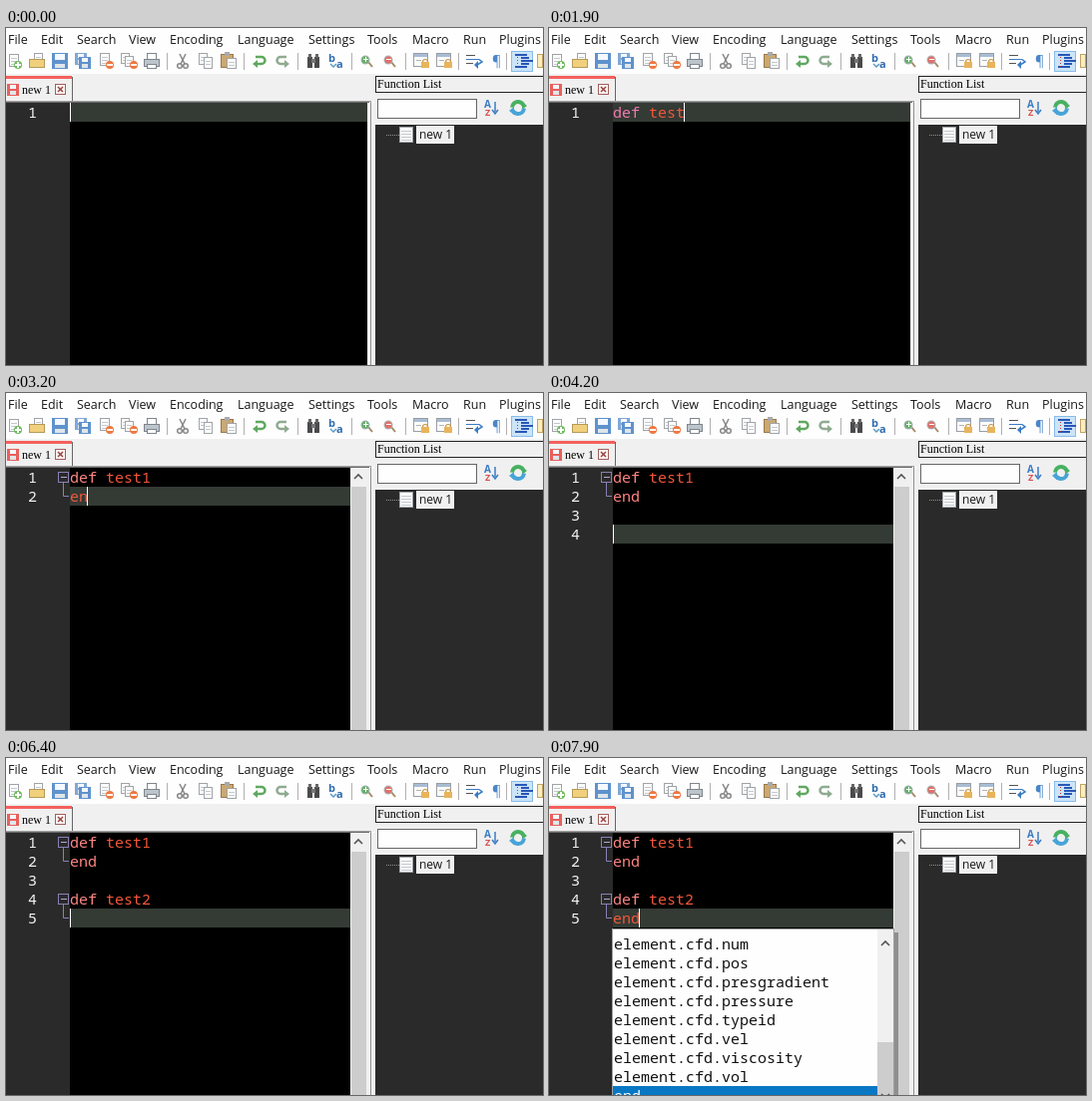
Recreate the animation shown at these times as an HTML page with a canvas. Size 538x338 px, loop 8 s.

```html
<!DOCTYPE html>
<html lang="en">
<head>
<meta charset="utf-8">
<style>
html, body { margin: 0; width: 100%; height: 100%; overflow: hidden; background: #fff; }
canvas { display: block; }
</style>
</head>
<body>
<canvas id="stage" width="538" height="338"></canvas>
<script>
const g = document.getElementById('stage').getContext('2d');
const LOOP = 8000, ROW = 19, CHAR = 9, TOP = 75, LEFT = 64;
const WHITE = '#fefefe', PALE = '#f0f0f0', DARK = '#2a2a2a', ACTIVE = '#343a34';
const KEYWORD = '#ff8583', FRESH = '#f07ab0', NAME = '#f4573b', GREY = '#80868c', BLUE = '#3a7cc4';
const MONO = '15px "Noto Sans Mono", monospace';
const SANS = '"Open Sans", "Noto Sans", sans-serif';
const SERIF = '12px "Liberation Serif", serif';

const first = 'def test1', block = first + '\nend\n', second = block + '\ndef test2\n';
const cfd = ['num', 'pos', 'presgradient', 'pressure', 'typeid', 'vel', 'viscosity', 'vol']
  .map(s => 'element.cfd.' + s).concat('end');

// time, text, completion list, column of the completed word
const steps = [
  [0, ''], [300, 'd'], [500, 'de'], [700, 'def'], [900, 'def '],
  [1100, 'def t'], [1200, 'def te'], [1400, 'def tes'], [1600, 'def test'], [2000, first],
  [2400, first + '\n'], [3000, first + '\ne'], [3200, first + '\nen'],
  [3300, first + '\nen', cfd, 0], [3500, first + '\nend', cfd, 0],
  [3700, first + '\nend'], [3800, block], [4000, block + '\n'],
  [4400, block + '\nd', ['def'], 0], [4700, block + '\nde', ['def'], 0],
  [4900, block + '\ndef', ['def'], 0], [5100, block + '\ndef '],
  [5400, block + '\ndef t', ['test1'], 4], [5500, block + '\ndef te', ['test1'], 4],
  [5600, block + '\ndef tes', ['test1'], 4], [5700, block + '\ndef test', ['test1'], 4],
  [6000, block + '\ndef test2'], [6400, second], [7000, second + 'e'],
  [7400, second + 'en', cfd, 0], [7800, second + 'end', cfd, 0]
];

function box(x, y, w, h, fill, edge) {
  g.fillStyle = edge || fill;
  g.fillRect(x, y, w, h);
  if (edge) {
    g.fillStyle = fill;
    g.fillRect(x + 1, y + 1, w - 2, h - 2);
  }
}

function text(s, x, y, font, color) {
  g.font = font;
  g.fillStyle = color;
  g.fillText(s, x, y);
}

function line(color, width, ...p) {
  g.strokeStyle = color;
  g.lineWidth = width;
  g.beginPath();
  for (let i = 0; i < p.length; i += 2) g.lineTo(p[i], p[i + 1]);
  g.stroke();
}

function arc(x, y, r, color, width, a = 0, b = 7) {
  g.strokeStyle = color;
  g.lineWidth = width;
  g.beginPath();
  g.arc(x, y, r, a, b);
  g.stroke();
}

function dot(x, y, r, color) {
  g.fillStyle = color;
  g.beginPath();
  g.arc(x, y, r, 0, 7);
  g.fill();
}

function page(x, y, w = 10, h = 13) {
  box(x, y, w, h, '#fcfcfc', '#a0a4a8');
  for (let i = 4; i < h - 2; i += 3) box(x + 2, y + i, w - 4, 1, '#c4c8cc');
}

function disk(x, y, s, color) {
  box(x, y, s, s, color);
  box(x + 3, y + 1, s - 6, s / 2 - 2, '#f4f8ff');
  box(x + 3, y + s - 5, s - 6, 4, '#dfe6ea');
}

function wedge(x, y, dx, color) {
  g.fillStyle = color;
  g.beginPath();
  g.moveTo(x, y - 4);
  g.lineTo(x + dx, y);
  g.lineTo(x, y + 4);
  g.fill();
}

function chevron(x, y, dir = 1) {
  line('#555', 1.6, x - 4, y + 2 * dir, x, y - 2 * dir, x + 4, y + 2 * dir);
}

// hook with its arrowhead at the lower end
function turn(x, side, color) {
  line(color, 2.5, x - side * 4, 29, x + side * 2, 29);
  arc(x + side * 2, 32.5, 3.5, color, 2.5, side > 0 ? -1.57 : 1.57, side > 0 ? 1.57 : 4.71);
  line(color, 2.5, x + side * 2, 36, x - side * 2, 36);
  wedge(x - side * 2, 36, -side * 5, color);
}

function lens(x, color, plus) {
  line('#a58a68', 2, x + 2, 34, x + 6, 39);
  dot(x - 1, 32, 4.5, '#a8b4b8');
  dot(x - 1, 32, 3.5, color);
  box(x - 3, 31, 5, 1, '#fff');
  if (plus) box(x - 1, 29, 1, 5, '#fff');
}

function sync(x) {
  box(x - 8, 25, 15, 14, '#fcfcfc', '#9a9ea4');
  box(x - 7, 26, 13, 3, '#a8bcd4');
  box(x - 5, 32, 5, 1, '#b0b4b8');
  box(x, 34, 8, 6, '#e8b45c');
  arc(x + 4, 34, 2.5, '#c89848', 1.2, 3.14, 6.28);
}

function toolbar() {
  page(3, 26); dot(12, 37, 4, '#6cba5c'); box(9, 36, 6, 2, '#fff'); box(11, 34, 2, 6, '#fff');
  page(28, 25, 9, 10); box(23, 31, 16, 9, '#f0d07c', '#b59a58');
  disk(46, 25, 16, '#5f92cc');
  disk(69, 25, 12, '#82a8d4'); disk(73, 29, 12, '#5f92cc');
  page(94, 25); dot(104, 37, 4, '#ee7840'); box(101, 36, 6, 2, '#fff');
  page(115, 25, 9, 11); page(119, 28, 9, 11); dot(128, 37, 4, '#ee7840'); box(125, 36, 6, 2, '#fff');
  box(141, 25, 10, 7, '#fff', GREY); box(138, 31, 16, 8, '#bcc4cc', GREY); box(141, 36, 10, 5, '#fff', GREY);

  line('#888', 1.5, 174, 26, 179, 36); line('#888', 1.5, 180, 26, 175, 36);
  arc(174, 38, 2.3, '#888', 1.5); arc(180, 38, 2.3, '#888', 1.5);
  page(193, 25, 9, 12); page(198, 29, 9, 12);
  box(215, 26, 13, 14, '#cca870', '#98784c'); box(219, 24, 5, 4, '#aaa'); page(221, 30, 10, 11);
  turn(254, 1, '#5fa860'); turn(277, -1, '#8fab90');

  box(302, 29, 5, 11, '#4a4a4c'); box(309, 29, 5, 11, '#4a4a4c');
  box(303, 26, 3, 4, '#666'); box(310, 26, 3, 4, '#666'); box(306, 31, 4, 4, '#777');
  text('b', 323, 34, 'bold 11px ' + SANS, '#2f6cb0');
  text('a', 331, 40, 'bold 11px ' + SANS, '#2f6cb0');
  line('#5c9cc4', 1.5, 325, 36, 328, 39, 331, 36);
  lens(361, '#68b068', true); lens(384, '#e07068', false);
  sync(416); sync(439);

  box(461, 27, 9, 1, '#555'); box(461, 31, 13, 1, BLUE); box(461, 35, 7, 1, '#555');
  line(BLUE, 1.5, 474, 31.5, 477, 34, 472, 37); wedge(473, 37, -4, BLUE);
  text('¶', 487, 38, '14px ' + SANS, '#4a86c8');
  box(506, 23, 22, 21, '#cce4f8', '#88bce8');
  for (let i = 0; i < 5; i++) box(i % 4 ? 516 : 510, 26 + i * 3, i % 2 ? 8 : 12, 2, '#2858b8');
  for (let i = 0; i < 4; i++) box(512, 29 + i * 3, 1, 1, '#c33');
  box(532, 26, 6, 14, '#fbeebc', '#c0a468');
  for (const x of [161, 238, 292, 346, 400, 453, 501]) box(x, 25, 1, 17, '#b0b0b0');
}

function frame() {
  box(0, 0, 538, 338, WHITE);
  const menu = { File: 2, Edit: 35, Search: 71, View: 123, Encoding: 164, Language: 232,
    Settings: 303, Tools: 362, Macro: 407, Run: 458, Plugins: 494 };
  for (const name in menu) text(name, menu[name], 16, '12.5px ' + SANS, '#181818');
  toolbar();

  box(0, 46, 370, 28, PALE);
  box(0, 48, 66, 3, '#f4605c');
  box(66, 49, 1, 25, '#666');
  disk(1, 56, 12, '#e8605c');
  text('new 1', 16, 66, SERIF, '#000');
  box(49, 56, 11, 11, '#fbf4f2', '#a3605c');
  line('#964440', 1.5, 52, 59, 57, 64);
  line('#964440', 1.5, 57, 59, 52, 64);
  box(0, 73, 366, 1, '#a0a0a0');
  box(0, 74, 364, 1, '#696969');

  box(362, 75, 8, 263, PALE);
  box(365, 74, 1, 264, '#909090');
  box(369, 46, 169, 52, PALE);
  box(370, 48, 169, 17, PALE, '#222');
  text('Function List', 372, 60, SERIF, '#000');
  box(372, 71, 100, 20, WHITE, '#666');
  text('A', 479, 80, 'bold 10px ' + SANS, BLUE);
  text('Z', 480, 88, 'bold 9px ' + SANS, '#d85050');
  line(BLUE, 1.5, 490, 74, 490, 84);
  line(BLUE, 1.5, 487, 82, 490, 86, 493, 82);
  arc(513, 80, 6, '#48b060', 4, 3.2, 5.9); wedge(517, 78, 5, '#48b060');
  arc(513, 80, 6, '#48a4d8', 4, 0.1, 2.7); wedge(509, 83, -5, '#48a4d8');

  box(370, 97, 168, 241, DARK);
  for (let x = 381; x < 394; x += 2) box(x, 107, 1, 1, '#909090');
  page(394, 99, 14, 16);
  box(411, 98, 38, 18, PALE);
  text('new 1', 414, 111, '12px ' + SANS, '#181818');
}

function fold(y) {
  g.strokeStyle = '#8b80b5';
  g.lineWidth = 1;
  g.strokeRect(52.5, y + 4.5, 10, 10);
  line('#b5a9d0', 1, 55, y + 9.5, 61, y + 9.5);
  line('#8b80b5', 1, 57.5, y + 15, 57.5, y + 28.5, 63, y + 28.5);
}

function popup(items, x, y) {
  const long = items.length > 1, w = long ? 283 : 145, h = 7 + items.length * ROW;
  g.fillStyle = 'rgba(0,0,0,.3)';
  g.fillRect(x + 4, y + 4, w, h);
  box(x, y, w, h, WHITE, '#a0a0a0');
  items.forEach((s, i) => {
    const top = y + 6 + i * ROW, chosen = i === items.length - 1;
    if (chosen) box(x + 1, top, w - 2, ROW, '#0878c4');
    text(s, x + 2, top + 15, MONO, chosen ? '#fff' : '#101010');
  });
  if (long) {
    box(x + 266, y + 1, 16, h - 2, PALE);
    chevron(x + 274, y + 15);
    box(x + 266, y + 114, 16, 53, '#cdcdcd');
    chevron(x + 274, y + h - 10, -1);
  }
}

function editor(t) {
  const [, typed, items, col] = steps.findLast(s => s[0] <= t);
  const lines = typed.split('\n'), last = lines.length - 1, y = TOP + last * ROW;
  box(0, TOP, LEFT, 263, DARK);
  box(LEFT, TOP, 298, 263, '#000');
  box(LEFT, y, 298, ROW, ACTIVE);
  if (last > 0) {
    box(345, TOP, 17, 263, PALE);
    chevron(353, 84);
    box(346, 94, 15, 244, '#cdcdcd');
  }
  lines.forEach((s, i) => {
    const top = TOP + i * ROW, base = top + 15, def = s.startsWith('def');
    text(i + 1, 22, base, MONO, '#f4f4f4');
    if (def && i < last) fold(top);
    const known = def || s === 'end' && i < last ? 3 : 0;
    text(s.slice(0, known), LEFT, base, MONO, i === last ? FRESH : KEYWORD);
    text(s.slice(known), LEFT + known * CHAR, base, MONO, NAME);
  });
  box(LEFT + Math.max(0, lines[last].length * CHAR - 1), y, 1, ROW, '#fff');
  if (items) popup(items, LEFT - 1 + col * CHAR, y + ROW + 1);
}

function draw(now) {
  frame();
  editor(now % LOOP);
  requestAnimationFrame(draw);
}
requestAnimationFrame(draw);
</script>
</body>
</html>
```
